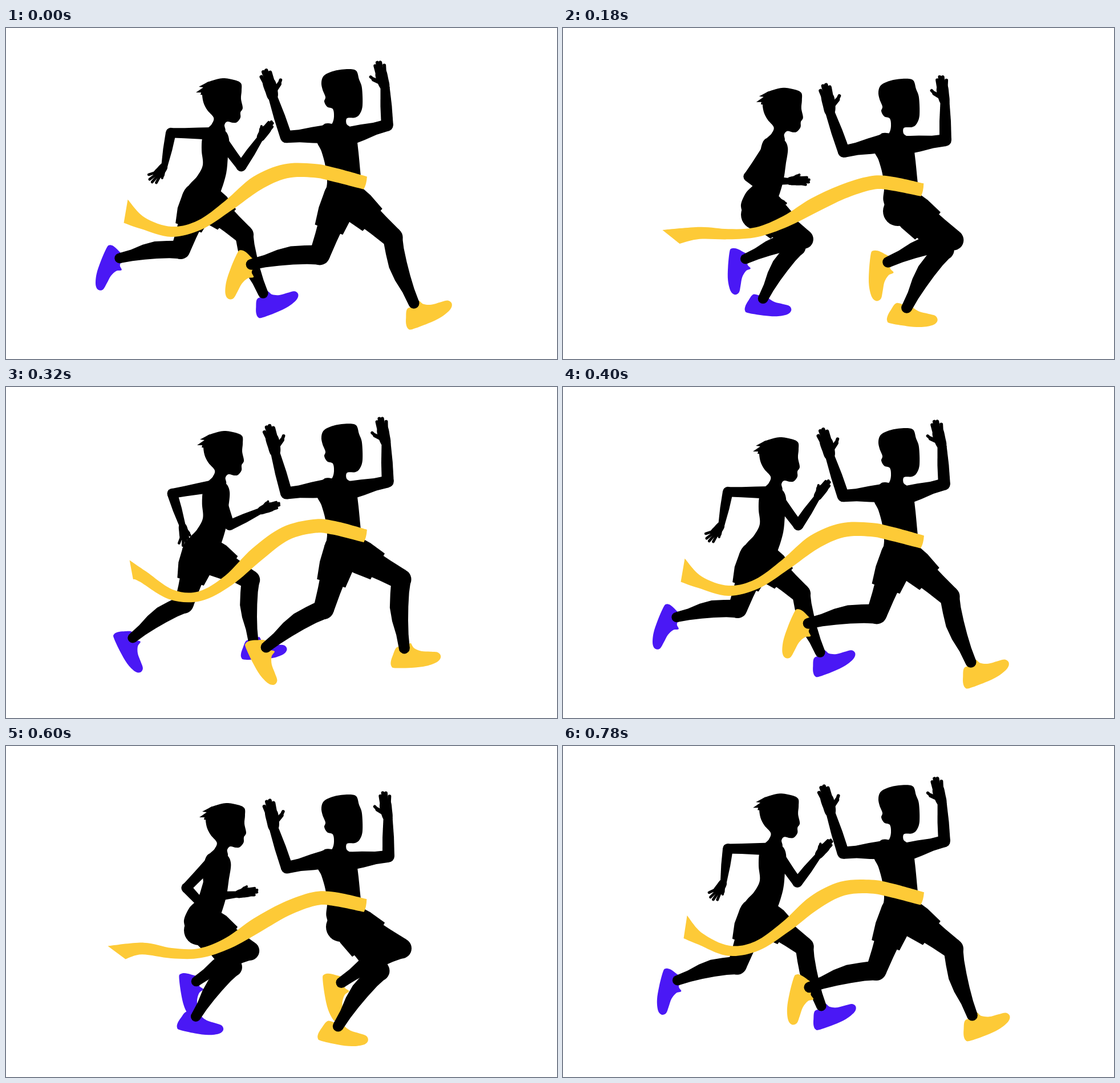
An HTML page with a canvas for the animation above (800 ms loop, 966 px wide and 580 px high).

```html
<!DOCTYPE html>
<html lang="en">
<head>
<meta charset="utf-8">
<title>Finish line</title>
<style>
  html, body { margin: 0; width: 100%; height: 100%; overflow: hidden; background: #fff; }
  canvas { display: block; width: 966px; height: 580px; }
</style>
</head>
<body>
<canvas id="stage" width="966" height="580"></canvas>
<script>
const ctx = document.getElementById('stage').getContext('2d');
const LOOP = 800, STEP = LOOP / 2, TICK = 20;
const BLACK = '#000', YELLOW = '#fdca37', BLUE = '#4a18f5';
const RAD = Math.PI / 180;
const clamp = v => Math.min(1, Math.max(0, v));
const mix = (a, b, k) => [a[0] + (b[0] - a[0]) * k, a[1] + (b[1] - a[1]) * k];
const pairs = a => a.reduce((out, v, i) => (i % 2 ? out[out.length - 1].push(v) : out.push([v]), out), []);

// ---- motion ------------------------------------------------------------

// One swing per step: mean plus cosine and sine parts.
function wave(t, [mean, c, s]) {
  const a = 2 * Math.PI * t / STEP;
  return mean + c * Math.cos(a) + s * Math.sin(a);
}

// Smooth periodic curve through rows of [time, ...values].
function pose(rows, t) {
  t %= LOOP;
  const n = rows.length;
  let i = n - 1;
  while (rows[i][0] > t) i--;
  const at = j => {
    const lap = Math.floor(j / n), [time, ...v] = rows[j - lap * n];
    return { t: time + lap * LOOP, v };
  };
  const [p, a, b, q] = [at(i - 1), at(i), at(i + 1), at(i + 2)];
  const h0 = a.t - p.t, h = b.t - a.t, h1 = q.t - b.t, u = (t - a.t) / h;
  return a.v.map((va, c) => {
    const vb = b.v[c], d = (vb - va) / h;
    const ma = ((va - p.v[c]) / h0 * h + d * h0) / (h0 + h);
    const mb = (d * h1 + (q.v[c] - vb) / h1 * h) / (h + h1);
    const w = u * u * (3 - 2 * u), r = u * (1 - u) * h;
    return va * (1 - w) + vb * w + r * ((1 - u) * ma - u * mb);
  });
}

// Key poses in degrees, 0 pointing down and 90 ahead: thigh, shin, shoe.
const stride = [
  [0, 48.5, 18, -26],
  [80, 57, 4, 1],
  [190, 38, -35, 5],
  [260, 0, -42, 24],
  [400, -20, -82, 108],
  [480, -9, -107, 125],
  [590, 56, -66, 84],
  [660, 58, -22, 28],
  [780, 53.5, 16, -25]
];

// Upper arm, forearm, hand.
const armSwing = [
  [0, -91, -11, -39],
  [80, -80, -4, -36],
  [190, -21, 93, 99],
  [260, -2, 93, 91],
  [400, 37, 146, 145],
  [480, 24, 141, 140],
  [590, -40, 46, 30],
  [660, -63, 40, 40]
];

// Raised arms: shoulder, lengths, and a wave for each joint's angle.
const raisedArms = [
  { from: [560, 186], len: [69, 73, 52], thumb: 1, angles: [[-82, -4, 0], [-161.5, 0, 3.3], [-168, 3, 0]] },
  { from: [603, 189], len: [68, 67, 48], thumb: -1, angles: [[101.5, 4.5, 0], [182, 1.3, 0], [193.5, 3, 0]] }
];

const man = {
  chest: [6.5, -6.5, 13], waist: [4, -4, 13.9], lean: [0, 0, 0],
  hip: [590, 295], thigh: 109, shin: 121, girth: 1, shoe: 1, lift: 17, color: YELLOW
};
const boy = {
  chest: [6, -6, 16], waist: [4.5, -4.5, 14], lean: [3, -3, 0],
  hip: [341, 300], thigh: 94, shin: 108, girth: 0.93, shoe: 0.92, lift: 0, color: BLUE
};

// Ribbon middle line: x, half width, and a wave for y.
const ribbon = [
  [240, 10.5, [348.5, -6.5, 15]], [290, 9, [360, -3, -5]], [340, 8.5, [354, -9, -16]],
  [390, 10, [328, -17, -17]], [440, 13, [293, -21, -7]], [490, 12.5, [268.5, -17.5, 6.5]],
  [540, 12, [259, -9, 13]], [575, 12, [262.5, -5.5, 14.7]], [630, 11.5, [275.5, -4, 13.9]]
];

// ---- outlines ----------------------------------------------------------

const shoe = pairs([
  -11, -21, -20, -8, -25, 3, -25, 11, -19, 15, 10, 18, 36, 18, 56, 13,
  63, 5, 59, -3, 46, -6, 30, -9, 18, -16, 13, -25, 5, -19
]);
const manHead = pairs([
  553, 95, 558, 83, 576, 75, 600, 72, 614, 75, 619, 90, 624, 105, 625, 136, 620, 151, 612, 157,
  598, 158, 597, 168, 604, 176, 590, 190, 562, 180, 572, 167, 575, 155, 573, 142, 563, 138,
  558, 129, 560, 121, 555, 108
]);
const manTorso = pairs([
  556, 170, 572, 168, 590, 172, 602, 174, 614, 177, 616, 200, 618, 218, 621, 250, 624, 290,
  615, 315, 575, 315, 562, 292, 563, 268, 560, 242, 553, 216, 545, 196
]);
const boyHead = pairs([
  349, 98, 362, 92, 380, 88, 400, 91, 412, 97, 413, 110, 412, 124, 415, 140, 411, 148, 411, 157,
  405, 165, 398, 166, 388, 164, 383, 170, 384, 182, 368, 192, 352, 180, 361, 168, 364, 157,
  353, 144, 346, 130, 344, 112
]);
const boyHair = pairs([355, 94, 338, 103, 346, 104, 333, 113, 342, 113, 341, 117, 352, 118]);
const boyTorso = pairs([
  350, 178, 366, 174, 383, 179, 391, 195, 389, 225, 386, 255, 376, 288, 365, 312, 325, 318,
  312, 300, 320, 277, 335, 260, 345, 240, 343, 215, 344, 193
]);

// ---- drawing -----------------------------------------------------------

function bends(pts, closed) {
  const n = pts.length;
  const at = i => closed ? pts[(i + n) % n] : pts[Math.min(n - 1, Math.max(0, i))];
  for (let i = 0; i < (closed ? n : n - 1); i++) {
    const [p, a, b, q] = [at(i - 1), at(i), at(i + 1), at(i + 2)];
    ctx.bezierCurveTo(a[0] + (b[0] - p[0]) / 6, a[1] + (b[1] - p[1]) / 6,
      b[0] - (q[0] - a[0]) / 6, b[1] - (q[1] - a[1]) / 6, b[0], b[1]);
  }
}

function blob(pts, color = BLACK) {
  ctx.fillStyle = color;
  ctx.beginPath();
  ctx.moveTo(...pts[0]);
  bends(pts, true);
  ctx.fill();
}

function poly(pts) {
  ctx.beginPath();
  pts.forEach(p => ctx.lineTo(...p));
  ctx.fill();
}

function dot([x, y], r) {
  ctx.beginPath();
  ctx.arc(x, y, r, 0, 7);
  ctx.fill();
}

// A tapered part from a to b; widths to each side are spread evenly.
function part(a, b, back, front = back) {
  const len = Math.hypot(b[0] - a[0], b[1] - a[1]);
  const nx = (a[1] - b[1]) / len, ny = (b[0] - a[0]) / len;
  const edge = (widths, s) => widths.map((w, i) => {
    const [x, y] = mix(a, b, i / (widths.length - 1));
    return [x + nx * w * s, y + ny * w * s];
  });
  poly([...edge(back, 1), ...edge(front, -1).reverse()]);
}

// Joints of a limb; twist carries its root along with the swing.
function chain([x, y], angles, lengths, twist = 0) {
  const joints = [[x + twist * Math.sin(angles[0] * RAD), y]];
  lengths.forEach((len, i) => {
    const [px, py] = joints[i], a = angles[i] * RAD;
    joints.push([px + Math.sin(a) * len, py + Math.cos(a) * len]);
  });
  return joints;
}

function drawShoe([x, y], angle, size, color) {
  ctx.save();
  ctx.translate(x, y);
  ctx.rotate(angle * RAD);
  ctx.scale(size, size);
  blob(shoe, color);
  ctx.restore();
}

function drawLeg([hip, knee, ankle], girth) {
  const g = (...widths) => widths.map(w => w * girth);
  ctx.fillStyle = BLACK;
  dot(hip, 30);
  part(hip, mix(hip, knee, 0.57), [30, 30, 26 * girth]);
  part(mix(hip, knee, 0.4), knee, g(23, 20, 18));
  dot(knee, 18 * girth);
  part(knee, ankle, g(17, 20, 22, 19, 13, 9.5), g(17.5, 13, 10.5, 9, 8.5, 9.5));
  dot(ankle, 9.5 * girth);
}

function drawHand(wrist, tip, thumbSide, thumbOut, spread) {
  const dx = tip[0] - wrist[0], dy = tip[1] - wrist[1], size = Math.hypot(dx, dy);
  const at = (along, across) => {
    across *= thumbSide;
    return [wrist[0] + dx * along - dy * across, wrist[1] + dy * along + dx * across];
  };
  const finger = (a, b, w) => {
    ctx.lineWidth = size * w;
    ctx.beginPath();
    ctx.moveTo(...a);
    ctx.lineTo(...b);
    ctx.stroke();
  };
  ctx.strokeStyle = BLACK;
  ctx.lineCap = 'round';
  blob([at(-0.05, -0.14), at(0.25, -0.2), at(0.6, -0.2), at(0.64, 0), at(0.56, 0.2), at(0.25, 0.22), at(-0.05, 0.14)]);
  for (let i = 0; i < 4; i++) {
    const reach = 0.94 - 0.06 * (i - 1.7) ** 2;
    finger(at(0.5, (i - 1.5) * 0.09), at(reach, (-0.22 + i * 0.12) * spread), 0.125);
  }
  finger(at(0.2, 0.12), at(0.38, thumbOut * 0.8), 0.15);
  finger(at(0.38, thumbOut * 0.8), at(0.5, thumbOut), 0.11);
}

function drawArm([shoulder, elbow, wrist], upper, lower) {
  ctx.fillStyle = BLACK;
  dot(shoulder, upper[0]);
  part(shoulder, elbow, upper);
  dot(elbow, lower[0]);
  part(elbow, wrist, lower);
  dot(wrist, lower[lower.length - 1]);
}

// ---- runners -----------------------------------------------------------

// Moves a body point along with the bounce of chest and waist.
function carry(runner, t) {
  const [chest, waist, lean] = [runner.chest, runner.waist, runner.lean].map(w => wave(t, w));
  return ([x, y]) => [
    x + lean * clamp((250 - y) / 100),
    y + chest + (waist - chest) * clamp((y - 180) / 90)
  ];
}

function drawLegs(runner, hip, t) {
  const legs = [0, STEP].map(shift => {
    const phase = (t + shift) % LOOP;
    const [thigh, shin, angle] = pose(stride, phase);
    const lift = runner.lift * Math.exp(-(((phase - 655) / 45) ** 2));
    const drop = 16 * runner.shoe + Math.max(0, shin) * 0.5;
    const joints = chain(hip, [thigh + lift, shin, shin], [runner.thigh, runner.shin, drop], 8);
    return { joints, angle };
  });
  legs.forEach(l => drawShoe(l.joints[3], l.angle, runner.shoe, runner.color));
  legs.forEach(l => drawLeg(l.joints, runner.girth));
  dot([hip[0] - 3, hip[1] + 14], 26);
}

function drawBoy(t) {
  const fit = carry(boy, t);
  drawLegs(boy, fit(boy.hip), t);
  blob(boyTorso.map(fit));
  blob(boyHead.map(fit));
  poly(boyHair.map(fit));
  [0, STEP].forEach(shift => {
    const angles = pose(armSwing, t + shift);
    const arm = chain(fit([366, 185]), angles, [72, 59, 38], 5);
    drawArm(arm, [11, 10, 9, 8.5], [9, 8, 5.5]);
    drawHand(arm[2], arm[3], -1, 0.27, 0.7 + 0.7 * clamp(-angles[0] / 90));
  });
}

function drawMan(t) {
  const fit = carry(man, t);
  drawLegs(man, fit(man.hip), t);
  blob(manTorso.map(fit));
  blob(manHead.map(fit));
  raisedArms.forEach(({ from, len, thumb, angles }) => {
    const arm = chain(fit(from), angles.map(w => wave(t, w)), len);
    drawArm(arm, [16, 14, 11, 10.5], [10.5, 10, 8]);
    drawHand(arm[2], arm[3], thumb, 0.4, 0.9);
  });
}

function drawRibbon(t) {
  const line = ribbon.map(([x, , w]) => [x, wave(t, w)]);
  const edge = s => line.map(([x, y], i) => {
    const a = line[Math.max(0, i - 1)], b = line[Math.min(line.length - 1, i + 1)];
    const len = Math.hypot(b[0] - a[0], b[1] - a[1]), w = ribbon[i][1] * s;
    return [x - (b[1] - a[1]) / len * w, y + (b[0] - a[0]) / len * w];
  });
  const x = wave(t, [202, 8, -16]), y = wave(t, [341.5, -20.5, 16]);
  const dx = wave(t, [6, -9.5, 0]), dy = wave(t, [16, 4.5, 1]);
  const upper = [[x - dx, y - dy], ...edge(-1)];
  const lower = [...edge(1).reverse(), [x + dx, y + dy]];
  ctx.fillStyle = YELLOW;
  ctx.beginPath();
  ctx.moveTo(...upper[0]);
  bends(upper, false);
  ctx.quadraticCurveTo(632, line[line.length - 1][1] + 3, ...lower[0]);
  bends(lower, false);
  ctx.fill();
}

function draw(t) {
  ctx.fillStyle = '#fff';
  ctx.fillRect(0, 0, 966, 580);
  drawBoy(t);
  drawMan(t);
  drawRibbon(t);
}

const start = performance.now();
function frame() {
  const t = Math.max(0, performance.now() - start) % LOOP;
  draw(Math.floor(t / TICK) * TICK);
  requestAnimationFrame(frame);
}
frame();
</script>
</body>
</html>
```
